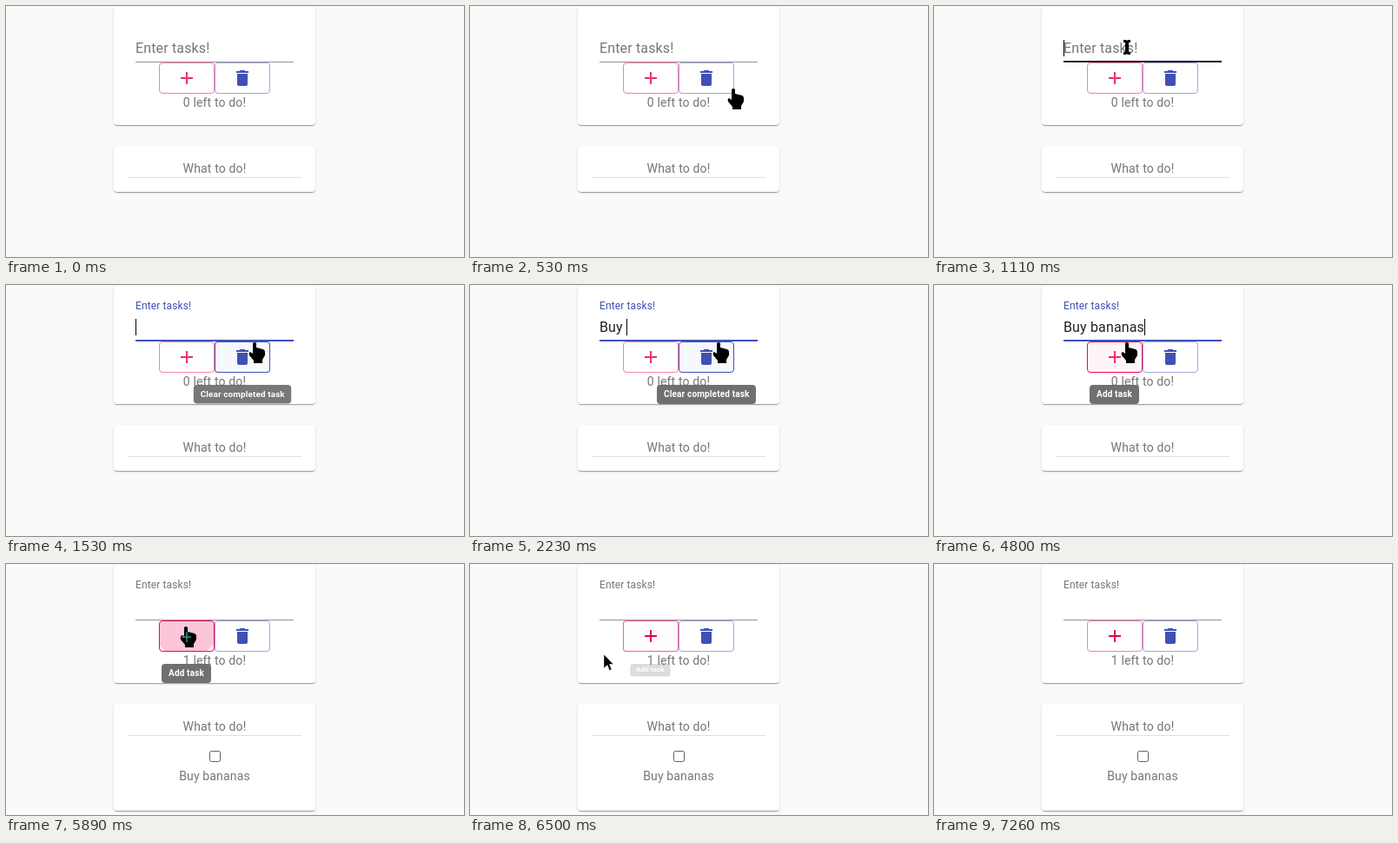
These frames come from a looping animation (527x289 px, 8000 ms). An HTML page:

```html
<!DOCTYPE html>
<html lang="en">
<head>
<meta charset="utf-8">
<title>Task list</title>
<style>
  html, body { margin: 0; width: 100%; height: 100%; overflow: hidden; background: #fafafa; }
  body { position: relative; font: 14px/20px Roboto, sans-serif; letter-spacing: .15px; }
  body *, body > * { box-sizing: border-box; }
  div, svg { position: absolute; }
  .card {
    left: 124px; width: 232px; background: #fff; border-radius: 4px;
    box-shadow: 0 2px 1px -1px #0003, 0 1px 1px #00000024, 0 1px 3px #0000001f;
  }
  .line { left: 124px; width: 232px; text-align: center; color: #0000008a; }
  .rule { left: 149px; width: 182px; }
  #label { left: 149px; top: 17px; font-size: 16px; line-height: 16px; transform-origin: 0 0; white-space: nowrap; }
  #typed { left: 149px; top: 39px; font-size: 16px; line-height: 19px; white-space: pre; color: #000000de; }
  #caret { top: 39px; width: 1px; height: 19px; background: #000; }
  .button { top: 65px; width: 64px; height: 36px; border: 1px solid; border-radius: 4px; overflow: hidden; }
  .button svg { left: 19px; top: 5px; }
  #ripple { border-radius: 50%; background: #f50057; }
  .tip {
    top: 115px; height: 22px; padding: 4px 8px; border-radius: 4px; background: #616161e6; color: #fff;
    font-size: 10px; line-height: 14px; font-weight: 700; white-space: nowrap; transform-origin: 50% 0;
  }
  #box { left: 234px; top: 215px; width: 13px; height: 13px; border: 1px solid #5f5f5f; border-radius: 2.5px; background: #fff; }
  #cursor { left: 0; top: 0; overflow: visible; }
</style>
</head>
<body>
  <div class="card" style="top:1px;height:136px"></div>
  <div class="card" id="list" style="top:161px"></div>
  <div id="label">Enter tasks!</div>
  <div id="typed"></div>
  <div id="caret"></div>
  <div class="rule" id="base"></div>
  <div class="rule" id="active" style="top:63px;height:2px;background:#3f51b5"></div>

  <div class="button" id="add" style="left:176px">
    <div id="ripple"></div>
    <svg width="24" height="24"><path id="plus" d="M19 13h-6v6h-2v-6H5v-2h6V5h2v6h6v2z"/></svg>
  </div>
  <div class="button" id="clear" style="left:240px">
    <svg width="24" height="24" fill="#3f51b5"><path d="M6 19c0 1.1.9 2 2 2h8c1.1 0 2-.9 2-2V7H6v12zM19 4h-3.5l-1-1h-5l-1 1H5v2h14V4z"/></svg>
  </div>

  <div class="line" id="count" style="top:101px"></div>
  <div class="line" style="top:177px">What to do!</div>
  <div style="left:140px;top:197px;width:200px;height:1px;background:#e0e0e0"></div>
  <div id="task">
    <div id="box"></div>
    <div class="line" style="top:234px">Buy bananas</div>
  </div>

  <div class="tip" id="addTip" style="left:179px">Add task</div>
  <div class="tip" id="clearTip" style="left:215px">Clear completed task</div>

  <svg id="cursor" width="1" height="1" stroke-linejoin="round">
    <path id="arrow" d="M0 0V16L4 12.5 6.5 18.5 9 17.5 6.5 11.5H11Z" stroke="#fff" stroke-width=".5"/>
    <path id="beam" d="M-4-8H-1L0-7 1-8H4V-5H2V6H4V9H1L0 8-1 9H-4V6H-2V-5H-4Z"/>
    <g id="hand">
      <path d="M-2 1Q0-1 2 1V6L10 8Q12 9 12 11V15L9 20V24H-1V21L-6 15Q-7 12-5 11L-2 13Z"/>
      <path id="glint" d="M1 6V18M-4 12H6" stroke="#2a9d85" stroke-width="1.5"/>
    </g>
  </svg>

<script>
const LOOP = 8000, FOCUS = 1100, PRESS = 5550, RELEASE = 5700, TEXT = 'Buy bananas';
const KEYS = [1600, 1940, 2090, 2230, 2549, 2550, 2720, 3020, 3310, 3390, 3470];

// Pointer moves: start, end, number of updates, then [time, x, y] points.
const MOVES = [
  [150, 770, 9, [[150, 365, 190], [390, 325, 112], [610, 255, 58], [770, 222, 47]]],
  [990, 1620, 9, [[1140, 222, 47], [1300, 262, 59], [1460, 286, 66]]],
  [4490, 4940, 7, [[4480, 286, 66], [4640, 222, 66]]],
  [5110, 5111, 2, [[5110, 207, 72]]],
  [6420, 7190, 11, [[6410, 200, 78], [6570, 115, 125], [6730, 66, 180], [6900, 170, 230], [7190, 445, 272]]]
];

const el = id => document.getElementById(id);
const show = (id, on) => el(id).style.display = on ? '' : 'none';
const part = (t, from, length) => Math.min(1, Math.max(0, (t - from) / length));
const out = p => 1 - (1 - p) ** 3;
const inOut = p => p * p * (3 - 2 * p);
const pulse = (t, from, to, length) => out(part(t, from, length)) - out(part(t, to, length));

function along(points, t) {
  const next = points.findIndex(p => p[0] > t);
  if (next < 0) return points[points.length - 1].slice(1);
  if (!next) return points[0].slice(1);
  const a = points[next - 1], b = points[next], k = (t - a[0]) / (b[0] - a[0]);
  return [a[1] + (b[1] - a[1]) * k, a[2] + (b[2] - a[2]) * k];
}

function drawCursor(t) {
  const visible = t >= 150 && t < 7260;
  show('cursor', visible);
  if (!visible) return;
  const [from, to, count, points] = MOVES.filter(m => m[0] <= t).pop();
  const step = (to - from) / (count - 1);
  const [x, y] = along(points, Math.min(to, from + Math.floor((t - from) / step + 1e-6) * step));
  const overInput = x > 149 && x < 331 && y > 33 && y < 65;
  const overButton = x > 176 && x < 304 && y >= 65 && y < 101;
  el('cursor').style.transform = `translate(${Math.round(x)}px, ${Math.round(y)}px)`;
  show('beam', overInput);
  show('hand', overButton);
  show('arrow', !overInput && !overButton);
  show('glint', t >= 5110);
}

function drawField(t) {
  const focused = t >= FOCUS && t < PRESS;
  const lift = out(part(t, FOCUS + 20, 200));
  el('label').style.transform = `translateY(${24 - 22.5 * lift}px) scale(${1 - lift / 4})`;
  el('label').style.color = focused && t > FOCUS + 20 ? '#3f51b5' : '#0000008a';

  const typed = KEYS.filter(k => k <= t).length;
  el('typed').textContent = t < RELEASE ? TEXT.slice(0, typed) : '';
  const last = typed ? KEYS[typed - 1] : FOCUS;
  show('caret', focused && Math.floor((t - last) / 540) % 2 === 0);
  el('caret').style.left = 149 + Math.round(el('typed').getBoundingClientRect().width) + 'px';

  const hovered = t >= 600 && t < 1300;
  Object.assign(el('base').style, {
    top: hovered ? '63px' : '64px',
    height: hovered ? '2px' : '1px',
    background: hovered ? '#000000de' : '#0000006b'
  });
  el('active').style.transform = `scaleX(${pulse(t, FOCUS + 20, PRESS, 200)})`;
}

function drawButton(id, rgb, hover) {
  el(id).style.borderColor = `rgba(${rgb},${.5 + hover / 2})`;
  el(id).style.backgroundColor = `rgba(${rgb},${hover * .04})`;
}

function drawTip(id, shown) {
  el(id).style.opacity = shown;
  el(id).style.transform = `scale(${.75 + shown / 4}, ${.56 + shown * .44})`;
}

function drawRipple(t) {
  const grow = inOut(part(t, PRESS, 480)), r = 46 * grow;
  Object.assign(el('ripple').style, {
    left: 30 - r + 'px', top: 6 - r + 'px', width: 2 * r + 'px', height: 2 * r + 'px',
    opacity: (.1 + .2 * grow) * (1 - inOut(part(t, RELEASE, 600)))
  });
}

function draw(t) {
  drawField(t);
  drawButton('add', '245,0,87', pulse(t, 4560, 6430, 200));
  drawButton('clear', '63,81,181', pulse(t, 1380, 4560, 200));
  drawTip('addTip', pulse(t, 4630, 6440, 160));
  drawTip('clearTip', pulse(t, 1420, 4560, 180));
  drawRipple(t);
  el('plus').setAttribute('fill', t < PRESS ? '#ee2e74' : '#e00055');
  const added = t >= RELEASE;
  el('count').textContent = `${+added} left to do!`;
  el('list').style.height = added ? '123px' : '53px';
  show('task', added);
  drawCursor(t);
}

const start = performance.now();
function tick() {
  draw((performance.now() - start) % LOOP);
  requestAnimationFrame(tick);
}
tick();
</script>
</body>
</html>
```
